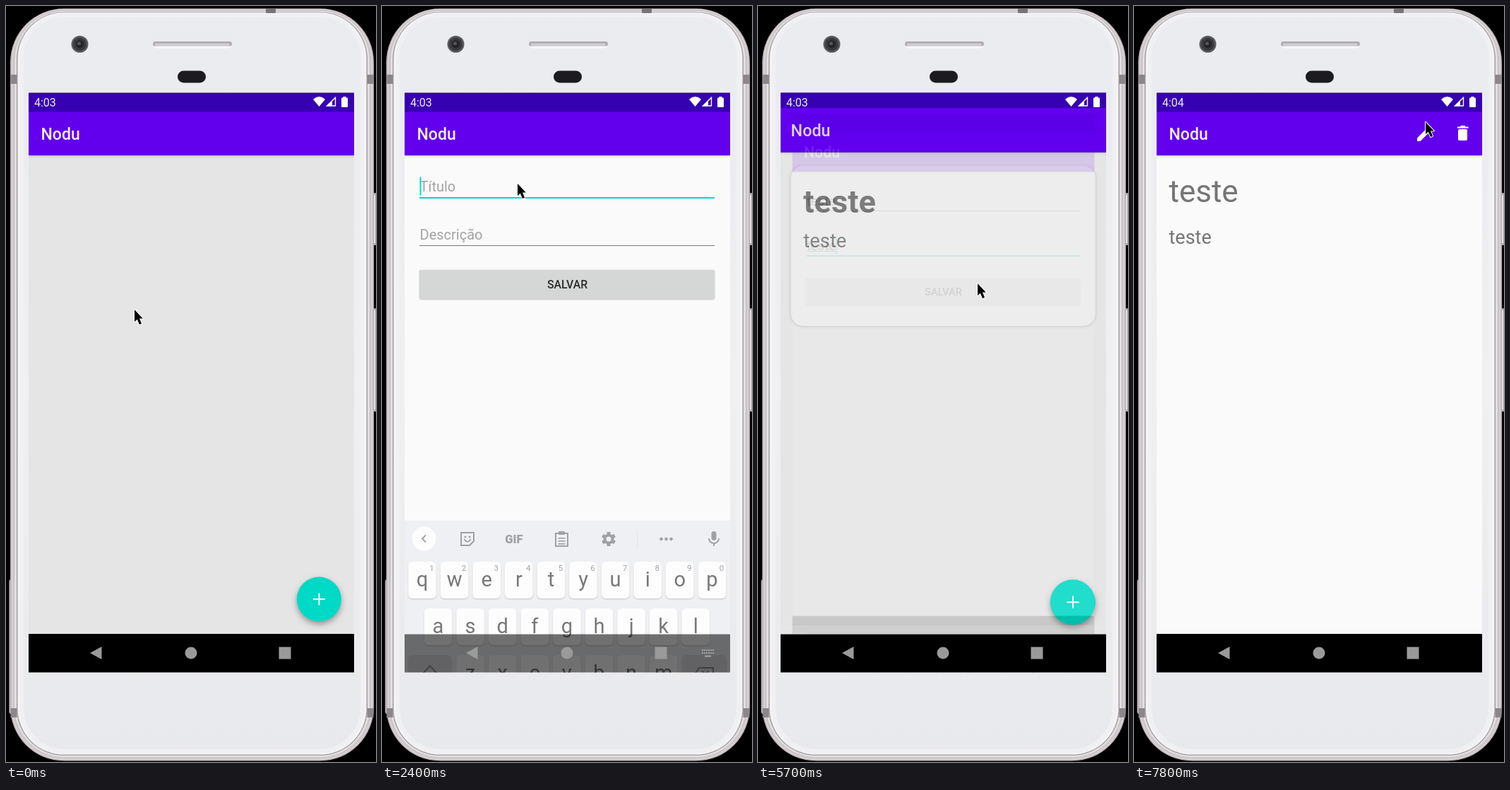
These frames come from a looping animation (524x1068 px, 8000 ms). An HTML page with a canvas:

```html
<!DOCTYPE html>
<html lang="pt">
<head>
<meta charset="utf-8">
<style>
  html, body { margin: 0; width: 100%; height: 100%; overflow: hidden; background: #000; }
  canvas { display: block; }
</style>
</head>
<body>
<canvas id="stage" width="524" height="1068"></canvas>
<script>
const stage = document.getElementById('stage').getContext('2d');
const layer = stage.canvas.cloneNode().getContext('2d');
let ctx = stage;
const LOOP = 8000, STEP = 100;
const APP = 'Nodu', TEAL = '#03dac5', GREY = '#5f6368';
const SCREEN = [32, 122.5, 461, 819], MID = [262.5, 531.5];

const clamp = v => Math.max(0, Math.min(1, v));
const smooth = v => v * v * (3 - 2 * v);
const easeOut = v => 1 - (1 - v) ** 3;

// Drawing helpers
function box(x, y, w, h, r, fill) {
  ctx.fillStyle = fill;
  ctx.beginPath();
  ctx.roundRect(x, y, w, h, r);
  ctx.fill();
}
function disc(x, y, r, fill) {
  box(x - r, y - r, 2 * r, 2 * r, r, fill);
}
function trace(points) {
  ctx.beginPath();
  for (let i = 0; i < points.length; i += 2) ctx.lineTo(points[i], points[i + 1]);
}
function poly(points, fill) {
  trace(points);
  ctx.fillStyle = fill;
  ctx.fill();
}
function line(points, color, width = 2, closed = false) {
  trace(points);
  if (closed) ctx.closePath();
  ctx.strokeStyle = color;
  ctx.lineWidth = width;
  ctx.stroke();
}
function ring(x, y, r, color, width = 2, from = 0, to = 2 * Math.PI) {
  ctx.beginPath();
  ctx.arc(x, y, r, from, to);
  ctx.strokeStyle = color;
  ctx.lineWidth = width;
  ctx.stroke();
}
function text(str, x, y, size, fill, weight = 400, align = 'left') {
  ctx.font = `${weight} ${size}px Roboto, sans-serif`;
  ctx.textAlign = align;
  ctx.fillStyle = fill;
  ctx.fillText(str, x, y);
}
function shadow(color, blur, dy, draw) {
  ctx.save();
  ctx.shadowColor = color;
  ctx.shadowBlur = blur;
  ctx.shadowOffsetY = dy;
  draw();
  ctx.restore();
}
// Fades a whole drawing as one flat picture
function faded(alpha, draw) {
  ctx = layer;
  ctx.clearRect(0, 0, 524, 1068);
  draw();
  ctx = stage;
  ctx.globalAlpha = alpha;
  ctx.drawImage(layer.canvas, 0, 0);
  ctx.globalAlpha = 1;
}

function phone() {
  box(0, 0, 524, 1068, 0, '#000');
  for (const [y, h] of [[264, 74], [427, 146]]) {
    box(516, y, 9, h, 2, '#a9a4a7');
    box(516, y + 2, 7, h - 4, 2, '#e4e0e3');
  }
  box(4.5, 810, 12, 190, 3, '#c9c4c7');
  const layers = [[0, '#b3adb0'], [1.5, '#d8d2d5'], [4, '#c8c2c5'], [6, '#e2dee0'],
                  [9, '#a39da0'], [10.5, '#f3f3f5'], [14, '#f0f0f3']];
  for (const [d, fill] of layers) box(6 + d, 3.5 + d * .55, 515 - 2 * d, 1063 - d * 1.4, 76 - d, fill);
  const body = ctx.createLinearGradient(0, 0, 0, 1068);
  body.addColorStop(0, '#e9ebee');
  body.addColorStop(.5, '#f0eff2');
  body.addColorStop(1, '#e8e9ec');
  box(25, 16, 477, 1034, 58, body);
  for (const y of [97, 992]) {
    box(6.5, y, 9, 13, 0, '#8b8689');
    box(511.5, y, 9, 13, 0, '#8b8689');
  }
  box(368, 4, 14, 6, 1, '#77747a');
  disc(104.5, 54, 12, '#5b5b5e');
  disc(104.5, 54, 9.5, '#3a3a3d');
  disc(104.5, 54, 5.5, '#242428');
  disc(103.5, 53, 2.5, '#55565c');
  box(208, 50, 112, 10, 5, '#f8f8fa');
  box(208, 50, 112, 7, 3.5, '#b3afb4');
  box(211, 53, 106, 4, 2, '#d0ced2');
  box(243, 91.5, 40, 17, 8.5, '#1c1b1f');
}

// Scenes of the app
function appWindow(background, content) {
  box(32, 211, 461, 676, 0, background);
  content();
  shadow('rgba(0,0,0,.25)', 3, 1, () => box(32, 149, 461, 62, 0, '#6200ee'));
  box(32, 122.5, 461, 27, 0, '#3700b3');
  box(32, 887.5, 461, 54, 0, '#000');
  text(APP, 49.5, 189, 23, '#f4eeff', 500);
}

function listScene(hasNote) {
  appWindow('#e5e5e5', () => {
    if (hasNote) {
      shadow('rgba(0,0,0,.16)', 4, .8, () => box(49.5, 230, 425.5, 223, 17, '#ebebeb'));
      text('teste', 67, 295, 44.5, '#6a6a6a', 700);
      text('teste', 67, 344, 27, '#757575');
    }
    shadow('rgba(0,0,0,.35)', 9, 4, () => disc(443.3, 838, 31.5, '#00d9c5'));
    line([435, 838, 452, 838], '#fff');
    line([443.5, 829.5, 443.5, 846.5], '#fff');
  });
}

function field(hint, value, y, focused, caretOn) {
  text(value || hint, 53.5, y, 20, value ? '#3c3c3c' : '#a3a3a3');
  const width = ctx.measureText(value).width;
  if (focused) {
    if (value) line([54, y + 2, 53.5 + width, y + 2], '#555', 1.2);
    if (caretOn) box(53.5 + width, y - 20.5, 2, 26, 0, TEAL);
    box(53, y + 8, 418, 2, 0, TEAL);
  } else {
    box(53, y + 8, 418, 1, 0, '#777');
  }
}

function formScene(s) {
  appWindow('#fafafa', () => {
    field('Título', s.title, 262, s.focus === 1, s.caretOn);
    field('Descrição', s.detail, 330, s.focus === 2, s.caretOn);
    shadow('rgba(0,0,0,.3)', 2, .5, () => box(53, 373, 418, 41, 2, '#d5d6d6'));
    text('SALVAR', 262.5, 399, 15.8, '#2a2a2a', 500, 'center');
  });
}

function noteScene() {
  appWindow('#fafafa', () => {
    text('teste', 49.5, 277, 44, '#757575');
    text('teste', 49.5, 336, 27, '#757575');
  });
  poly([401, 191, 401, 186.5, 413, 174.5, 417.5, 179, 405.5, 191], '#fff');
  poly([414.5, 173, 417, 170.5, 421, 174.5, 418.5, 177.5], '#fff');
  box(459, 174, 13, 16, 2, '#fff');
  box(458, 170.5, 15.5, 2.2, 0, '#fff');
  box(462.5, 169, 6.5, 2, 0, '#fff');
}

// Keyboard
function key(x, y, w, fill = '#fff') {
  shadow('rgba(0,0,0,.28)', 1.5, 1.2, () => box(x, y, w, 52, 6, fill));
}
function keyRow(letters, x, y, digits) {
  [...letters].forEach((letter, i) => {
    const cx = x + 45.6 * i;
    key(cx - 19.8, y, 39.6);
    text(letter, cx, y + 35, 29, '#1d1d1f', 400, 'center');
    if (digits) text((i + 1) % 10, cx + 13.5, y + 13, 11.5, GREY, 400, 'center');
  });
}

function strip(words) {
  const dir = words ? 1 : -1;
  disc(59.5, 595.5, 17, '#fff');
  line([59.5 - 2.5 * dir, 590.5, 59.5 + 2.5 * dir, 595.5, 59.5 - 2.5 * dir, 600.5], GREY);
  if (words) {
    words.forEach((w, i) => text(w, 133 + 127.5 * i, 604, 20, GREY, 400, 'center'));
    box(193, 582, 1, 27, 0, '#c4c5ca');
    box(327.5, 582, 1, 27, 0, '#c4c5ca');
  } else {
    line([112, 587, 130, 587, 130, 599, 124, 605, 112, 605], GREY, 2, true);
    disc(118, 593, 1.5, GREY);
    disc(124, 593, 1.5, GREY);
    ring(121, 595, 4.5, GREY, 1.8, .2, 2.9);
    text('GIF', 187, 602, 16.5, GREY, 900, 'center');
    line([246, 588, 263, 588, 263, 606, 246, 606], GREY, 2, true);
    box(250, 585, 9, 5, 1, GREY);
    for (const y of [594, 598, 602]) box(249.5, y, 10, 1.6, 0, GREY);
    ring(321, 596, 5.5, GREY, 4);
    for (let a = 0; a < 6; a++) {
      const c = Math.cos(a * Math.PI / 3 + .52), n = Math.sin(a * Math.PI / 3 + .52);
      line([321 + 6 * c, 596 + 6 * n, 321 + 10 * c, 596 + 10 * n], GREY, 5);
    }
    box(361, 584, 1, 25, 0, '#d2d3d8');
    for (const x of [395.5, 402.5, 409.5]) disc(x, 596, 2.3, GREY);
  }
  box(466.5, 585, 7, 13, 3.5, GREY);
  ring(470, 595, 7, GREY, 2, 0, Math.PI);
  line([470, 602, 470, 606], GREY);
}

function keyboard(s) {
  box(32, 570, 461, 320, 0, '#e8e9ee');
  box(32, 889, 461, 371, 0, '#fff');
  strip(s.words);
  keyRow('qwertyuiop', 57, 628, true);
  keyRow('asdfghjkl', 79.5, 694);
  keyRow('zxcvbnm', 125, 760);
  const dark = '#cacbd1', ink = '#3f4145';
  key(37, 760, 61.5, dark);
  line([68, 775, 79, 787, 73.5, 787, 73.5, 797, 62.5, 797, 62.5, 787, 57, 787], ink, 2, true);
  key(425, 760, 62.5, dark);
  line([443, 787, 449, 778, 469, 778, 469, 796, 449, 796], ink, 2, true);
  line([453.5, 782.5, 462.5, 791.5], ink);
  line([462.5, 782.5, 453.5, 791.5], ink);
  key(37, 826, 61.5, dark);
  text('?123', 67.5, 859, 19.5, ink, 500, 'center');
  key(105.5, 826, 39, dark);
  text(',', 125, 865, 23, '#222', 400, 'center');
  key(151, 826, 39);
  ring(170.5, 852, 10.5, ink);
  disc(166.7, 849, 1.7, ink);
  disc(174.3, 849, 1.7, ink);
  ring(170.5, 852.5, 5.5, ink, 2, .3, 2.84);
  key(197, 826, 176);
  key(380, 826, 38.5, dark);
  text('.', 399, 865, 23, '#222', 400, 'center');
  key(425, 826, 62.5, '#1a73e8');
  if (s.focus === 2) {
    line([447.5, 853, 453, 858.5, 465, 846.5], '#fff', 2.2);
  } else {
    line([445, 852, 462, 852], '#fff');
    line([456.5, 846, 462.5, 852, 456.5, 858], '#fff');
    line([466.5, 845, 466.5, 859], '#fff');
  }
}

function systemBars(t, shown) {
  text(t < 6000 ? '4:03' : '4:04', 40, 141.5, 16, '#f1ecff');
  poly([435, 132, 439, 129, 443.5, 128, 448, 129, 452, 132, 443.5, 142], '#fff');
  line([454.5, 141, 466.5, 141, 466.5, 129.5], '#fff', 1.4, true);
  poly([454, 141.5, 462, 134, 462, 141.5], '#fff');
  box(475, 129.5, 9, 13.5, 1.2, '#fff');
  box(477.5, 128, 4, 2, 0, '#fff');
  const up = shown === 1, fill = up ? '#8c8c8c' : '#9a9a9a';
  poly(up ? [119, 905.5, 138, 905.5, 128.5, 922] : [119, 914, 135.5, 905, 135.5, 923], fill);
  disc(262, 914, 8.5, fill);
  box(386.5, 905.5, 17, 17, 0, fill);
  if (shown > .3) {
    for (let i = 0; i < 12; i++) box(453 + i % 6 * 3, 909 + (i / 6 | 0) * 4, 2, 2, 0, '#a5a5a5');
    box(457, 917.5, 9, 2, 0, '#a5a5a5');
  }
}

// Window transitions
function scaled(scene, scale) {
  ctx.save();
  ctx.translate(...MID);
  ctx.scale(scale, scale);
  ctx.translate(-MID[0], -MID[1]);
  scene();
  ctx.restore();
}
function openOver(below, above, t, start) {
  const u = clamp((t - start) / 400), e = easeOut(u);
  if (u < 1) {
    scaled(below, 1 + .05 * e);
    box(...SCREEN, 0, `rgba(0,0,0,${.25 * e})`);
  }
  if (u > 0) faded(clamp(u * 4), () => scaled(above, .85 + .15 * e));
}
function closeOver(below, above, t, start) {
  const u = clamp((t - start) / 400), e = easeOut(u);
  scaled(below, 1.05 - .05 * e);
  if (u < .4) faded(1 - u * 2.5, () => scaled(above, 1 - .1 * e));
}

const typed = (t, start) => 'teste'.slice(0, clamp((t - start + 100) / 500) * 5 + .01);

function formState(t) {
  const first = ['tes', 'yes', 'teste'], final = ['teste', 'TESTE', 'teste2'];
  const focus = t < 2200 ? 0 : t < 3900 ? 1 : 2;
  const start = focus === 1 ? 2900 : 4100;
  const lastInput = t >= start ? Math.min(t, start + 400) : focus === 1 ? 2200 : 3900;
  return {
    title: typed(t, 2900),
    detail: typed(t, 4100),
    focus,
    caretOn: (t - lastInput) % 1000 <= 500,
    words: t < start ? null : t < start + 500 ? first : final
  };
}

const pointerPath = [
  [0, 182, 429], [200, 182, 429], [900, 441, 840], [1600, 441, 840], [2100, 192, 251],
  [2500, 192, 251], [2900, 178, 291], [3400, 178, 291], [3800, 460, 862], [4200, 460, 862],
  [4500, 466, 905], [4800, 463, 871], [5300, 311, 392], [5700, 311, 392], [6100, 311, 442],
  [6300, 311, 442], [6700, 306, 312], [7300, 306, 312], [7700, 413, 164], [8000, 413, 164]
];
function pointer(t) {
  const i = pointerPath.findIndex(p => p[0] > t);
  const [t0, x0, y0] = pointerPath[i - 1], [t1, x1, y1] = pointerPath[i];
  const e = smooth((t - t0) / (t1 - t0));
  ctx.save();
  ctx.translate(x0 + (x1 - x0) * e, y0 + (y1 - y0) * e);
  const arrow = [0, 0, 0, 17, 3.8, 13.7, 7, 21, 10, 19.7, 7, 12.5, 11.8, 12.5];
  ctx.lineJoin = 'round';
  line(arrow, '#fff', 2, true);
  poly(arrow, '#000');
  ctx.restore();
}

function draw(t) {
  phone();
  const s = formState(t);
  const shown = t < 5500 ? Math.sin(clamp((t - 2280) / 300) * Math.PI / 2)
                         : 1 - clamp((t - 5500) / 250);
  const form = () => formScene(s), empty = () => listScene(false), list = () => listScene(true);
  ctx.save();
  ctx.beginPath();
  ctx.rect(...SCREEN);
  ctx.clip();
  box(...SCREEN, 0, '#000');
  if (t < 5600) openOver(empty, form, t, 1180);
  else if (t < 7000) closeOver(list, form, t, 5560);
  else openOver(list, noteScene, t, 7080);
  if (shown > 0) {
    box(32, 887, 461, 55, 0, '#fafafa');
    faded(shown, () => {
      ctx.save();
      ctx.translate(0, (1 - shown) * 381);
      keyboard(s);
      ctx.restore();
    });
    box(32, 887.5, 461, 54, 0, `rgba(0,0,0,${clamp((1 - shown) * 1.35)})`);
  }
  systemBars(t, shown);
  ctx.restore();
  pointer(t);
}

function tick() {
  draw(Math.floor(performance.now() % LOOP / STEP) * STEP);
  requestAnimationFrame(tick);
}
tick();
</script>
</body>
</html>
```
